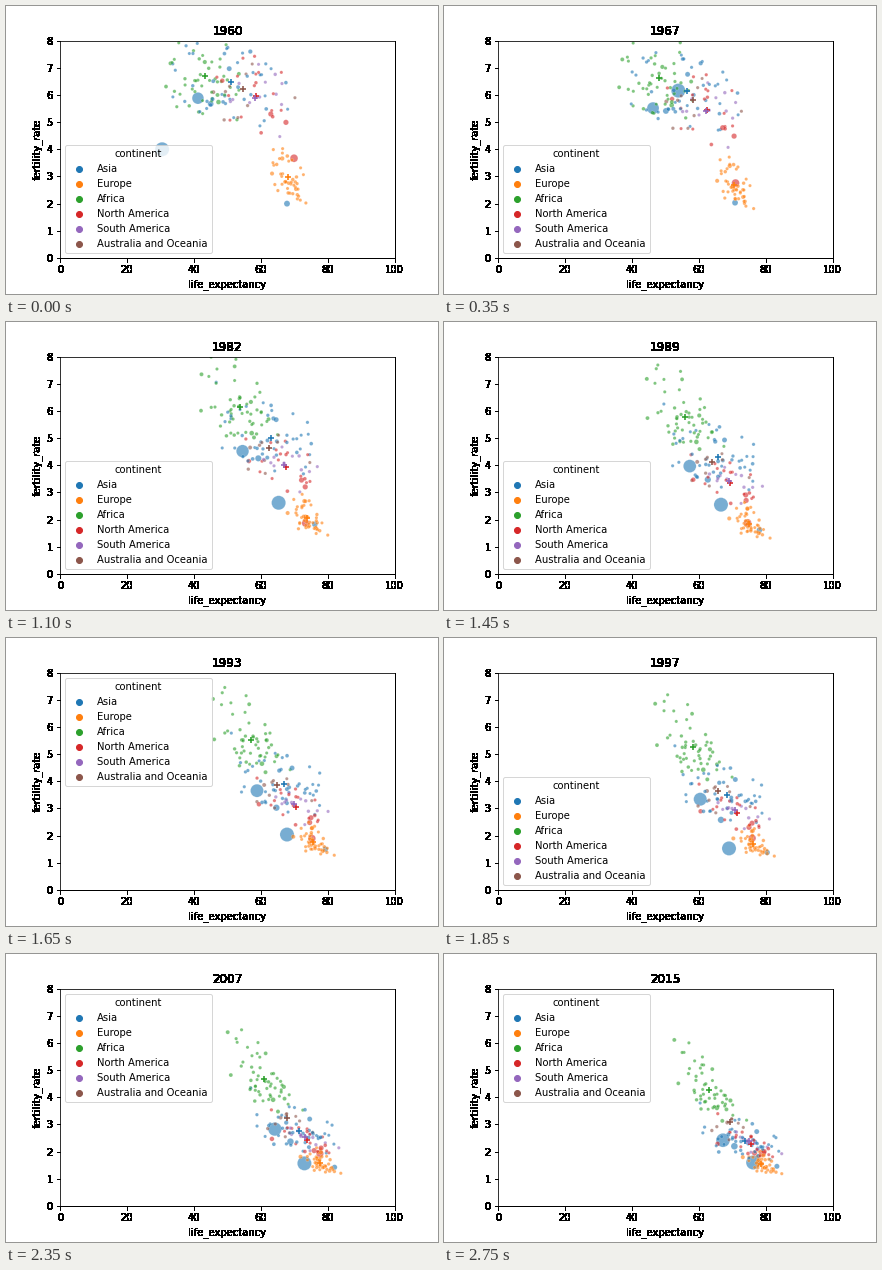
A matplotlib script for the animation above (2800 ms loop, 432 px wide and 288 px high).

```python
import numpy as np
import matplotlib.pyplot as plt
from matplotlib.animation import FuncAnimation
from matplotlib.colors import to_rgba

FIRST, LAST = 1960, 2015
FLOOR = 1.1         # lowest fertility rate

# Colour, country count, life expectancy at start and end, its spread,
# then the fertility decline: from, to, year of the steepest fall
CONTINENTS = {
    "Asia": ("C0", 44, 51, 73.8, 8.5, 6.9, 1.9, 1988),
    "Europe": ("C1", 43, 68, 78.7, 3.2, 3.6, 1.5, 1970),
    "Africa": ("C2", 52, 43.3, 63, 6, 6.85, 3.7, 1997),
    "North America": ("C3", 20, 58.5, 75.5, 6.5, 7, 2.1, 1976),
    "South America": ("C4", 12, 58.2, 75, 5.5, 6.8, 2.2, 1977),
    "Australia and Oceania": ("C5", 9, 54.7, 69.3, 8, 6.9, 2.9, 1979),
}

rng = np.random.default_rng(12)
years = np.arange(FIRST, LAST + 1)
progress = (years - FIRST) / (LAST - FIRST)


def blend(start, end, power=1.0):
    return start + (end - start) * progress ** power


def decline(high, low, middle, width=12):
    """Logistic fall from high to low."""
    return low + (high - low) / (1 + np.exp((years - middle) / width))


def drift():
    """A standardised offset that changes slowly over the years."""
    a, b = rng.triangular(-2.2, 0, 2.2, 2)
    return a * np.cos(0.8 * progress) + b * np.sin(0.8 * progress)


def marker_area(share):
    """Marker area for a population relative to the largest one."""
    return 10 + 190 * share


def giant(color, share, *points):
    """A populous country moving through (year, life, fertility) points."""
    when, life, fert = zip(*points)
    return (color, np.interp(years, when, life),
            np.interp(years, when, fert), marker_area(share))


def cloud(color, count, life, life_sd, fert):
    """Countries scattered around the path of their continent."""
    skew = 0.4 / np.sqrt(fert - FLOOR)
    corr = blend(-0.3, -0.6)
    for _ in range(count):
        z = drift()
        w = corr * z + np.sqrt(1 - corr ** 2) * drift()
        factor = np.exp(skew * w - skew ** 2 / 2)
        share = min(rng.lognormal(-5.2, 1.2), 0.1)
        yield (color, life + life_sd * z, FLOOR + (fert - FLOOR) * factor,
               np.full(years.size, marker_area(share)))


mean_life, mean_fert, small = [], [], []
for color, count, life0, life1, sd, high, low, middle in CONTINENTS.values():
    life = blend(life0, life1, 0.7)
    fert = decline(high, low, middle)
    mean_life.append(life)
    mean_fert.append(fert)
    small += cloud(color, count, life, blend(sd, 0.75 * sd), fert)
means_xy = np.stack((mean_life, mean_fert), axis=-1)

countries = [
    giant("C0", blend(1, 1), (1960, 30.5, 4), (1963, 50, 7.3),
          (1974, 60.6, 4.16), (1982, 65.3, 2.62), (1989, 66.6, 2.55),
          (1997, 69, 1.53), (2015, 76.2, 1.6)),
    giant("C0", blend(0.67, 0.95), (1960, 41.2, 5.88), (1974, 51.4, 5.15),
          (1997, 60.4, 3.34), (2015, 67.2, 2.42)),
    giant("C3", blend(0.27, 0.23), (1960, 69.9, 3.67), (1974, 72, 1.85),
          (2015, 79, 1.95)),
    giant("C0", blend(0.13, 0.19), (1960, 45, 5.67), (1974, 55.3, 5.15),
          (1997, 66.6, 2.58), (2015, 70.6, 2.2)),
    giant("C0", blend(0.14, 0.09), (1960, 67.8, 2), (1974, 73.8, 2.07),
          (1997, 80.4, 1.38), (2015, 83.3, 1.46)),
]
countries += [small[i] for i in rng.permutation(len(small))]
colors, life, fert, area = zip(*countries)
dots_xy = np.stack((life, fert), axis=-1)
area = np.array(area)


def solid(image, dpi):
    """Turn every touched pixel fully black, for heavy jagged edges."""
    out = np.zeros_like(image)
    out[..., 3] = image[..., 3] > 0
    return out, 0, 0


fig, ax = plt.subplots(figsize=(6, 4), dpi=72, facecolor="white")
fig.subplots_adjust(left=0.125, right=0.9, bottom=0.125, top=0.88)
ax.set(xlim=(0, 100), ylim=(0, 8), xticks=range(0, 101, 20), yticks=range(9),
       xlabel="life_expectancy", ylabel="fertility_rate")
title = ax.set_title(str(FIRST))
for part in (title, ax.xaxis.label, ax.yaxis.label,
             ax.spines["bottom"], ax.spines["right"],
             *ax.get_xticklabels(), *ax.get_yticklabels(),
             *ax.get_xticklines(), *ax.get_yticklines()):
    part.set_agg_filter(solid)

dots = ax.scatter(*dots_xy[:, 0].T, s=area[:, 0],
                  c=[to_rgba(c, 0.6) for c in colors],
                  edgecolors=[(1, 1, 1, 0.6)], linewidths=0.25)
means = ax.scatter(*means_xy[:, 0].T, s=36, marker="+", linewidths=1.6,
                   c=[row[0] for row in CONTINENTS.values()], zorder=2)
for name, row in CONTINENTS.items():
    ax.scatter([], [], color=row[0], label=name)
legend = ax.legend(title="continent", loc="lower left")


def draw(i):
    year = FIRST + i
    title.set_text(str(year))
    dots.set_offsets(dots_xy[:, i])
    dots.set_sizes(area[:, i])
    means.set_offsets(means_xy[:, i])
    on_top = 1991 <= year <= 1993 or year >= 2001
    legend.set_loc("upper left" if on_top else "lower left")
    return dots, means, title, legend


anim = FuncAnimation(fig, draw, frames=years.size, interval=50, repeat=True,
                     repeat_delay=0, blit=False)
plt.show()
```
